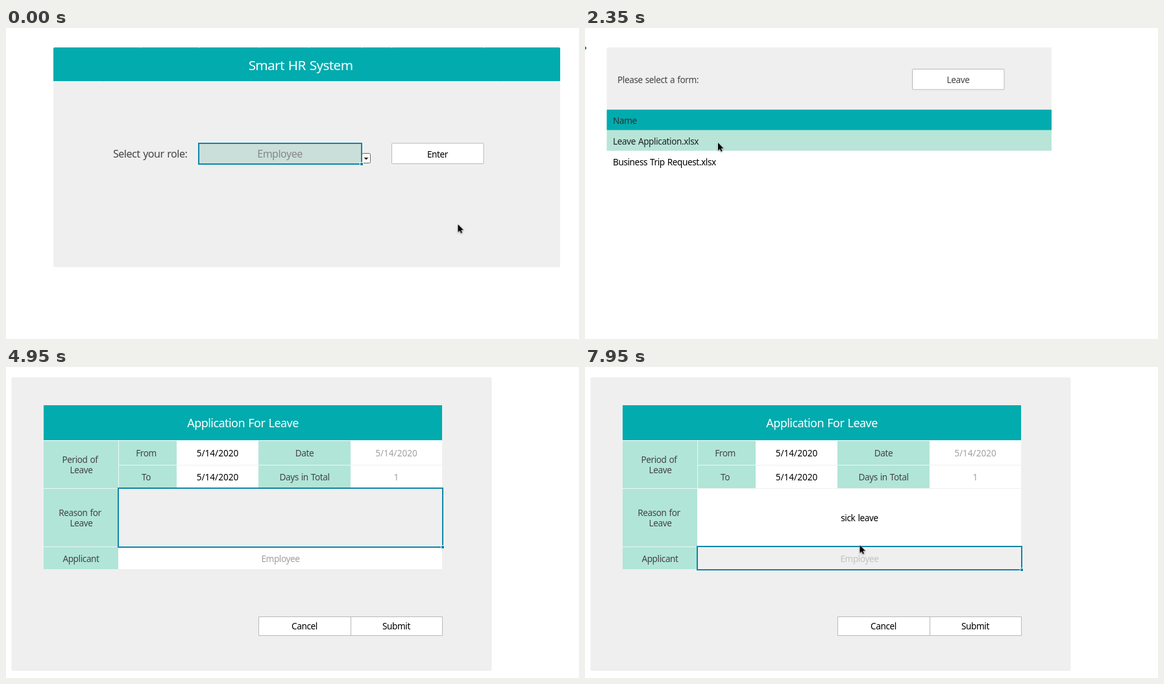
An HTML page that plays this animation: 883x480 px, repeating every 8000 ms.

```html
<!DOCTYPE html>
<html lang="en">
<head>
<meta charset="utf-8">
<title>Leave request demo</title>
<style>
html, body { margin: 0; width: 100%; height: 100%; overflow: hidden; background: #fff; }
svg { display: block; width: 883px; height: 480px; }
text {
  font: 13.6px "Noto Sans", "Open Sans", sans-serif;
  letter-spacing: -.03em; word-spacing: .06em; fill: #000;
}
.mid { text-anchor: middle; }
.title { font-size: 20.7px; fill: #fff; }
.heading { font-size: 18px; fill: #fff; }
.big { font-size: 16px; }
.num { letter-spacing: 0; }
.label { fill: #444; }
.muted { fill: #a0a0a0; }
.panel { fill: #efefef; }
.teal { fill: #02abae; }
.mint { fill: #b8e5d8; }
.cells { fill: #b1e5d8; }
.white { fill: #fff; }
.button { fill: #fff; stroke: #b9b9b9; }
.frame { fill: none; stroke: #0f86a8; stroke-width: 2; }
.handle { fill: #0f86a8; stroke: #fff; }
.editor { fill: #fff; stroke: #23798f; stroke-width: 2; filter: drop-shadow(0 1px 3px rgba(0,0,0,.4)); }

.anim { animation: 8s step-end infinite; }
#home { animation-name: home; }
#roleFocus { animation-name: roleFocus; }
#roleIdle, #enterFocus { animation-name: enterFocus; }
#list { animation-name: list; }
#form { animation-name: form; }
#corner { animation-name: corner; }
#reasonFocus { animation-name: reasonFocus; }
#edit { animation-name: edit; }
#done { animation-name: done; }
#pointer { animation-name: pointer; }
@keyframes home { 0% { opacity: 1 } 18.125%, 100% { opacity: 0 } }
@keyframes roleFocus { 0% { opacity: 1 } 10%, 100% { opacity: 0 } }
@keyframes enterFocus { 0% { opacity: 0 } 10%, 100% { opacity: 1 } }
@keyframes list { 0% { opacity: 0 } 18.125% { opacity: 1 } 36.25%, 100% { opacity: 0 } }
@keyframes form { 0% { opacity: 0 } 36.25%, 100% { opacity: 1 } }
@keyframes corner { 0% { opacity: 1 } 51.875%, 100% { opacity: 0 } }
@keyframes reasonFocus { 0% { opacity: 0 } 51.875% { opacity: 1 } 63.75%, 100% { opacity: 0 } }
@keyframes edit { 0% { opacity: 0 } 63.75% { opacity: 1 } 93.125%, 100% { opacity: 0 } }
@keyframes done { 0% { opacity: 0 } 93.125%, 100% { opacity: 1 } }
@keyframes pointer { 0% { opacity: 1 } 58.75% { opacity: 0 } 96.25%, 100% { opacity: 1 } }

#arrow { animation: travel 8s ease-in-out infinite; filter: drop-shadow(0 1px 1px rgba(0,0,0,.35)); }
@keyframes travel {
  0%, 2% { transform: translate(696.5px, 303px) }
  9.4%, 20.3% { transform: translate(642.5px, 200px) }
  22% { transform: translate(594px, 213px) }
  28.4%, 35% { transform: translate(205px, 177px) }
  37%, 43.5% { transform: translate(204px, 177px) }
  51.3%, 100% { transform: translate(423.5px, 275px) }
}
</style>
</head>
<body>
<svg viewBox="0 0 883 480">
  <g id="home" class="anim">
    <rect class="panel" x="73" y="30" width="781" height="339" rx="2"/>
    <path class="teal" d="M73 82V32q0-2 2-2H852q2 0 2 2V82z"/>
    <path d="M149 82.5h1M761 82.5h1M207 30.5h1M297 30.5h1M390 30.5h1M466 30.5h1M548 30.5h1M594 30.5h1M736 30.5h1" stroke="#8fd5d5"/>
    <text class="title mid" x="454" y="65">Smart HR System</text>
    <text class="big label" x="165" y="200">Select your role:</text>
    <rect class="button" x="594.5" y="178" width="141.5" height="31.5" rx="1"/>
    <text class="mid" x="665" y="200">Enter</text>
    <g id="roleIdle" class="anim">
      <rect class="mint" x="297" y="178" width="250" height="32"/>
      <text class="big mid label" x="422" y="200">Employee</text>
    </g>
    <g id="roleFocus" class="anim">
      <rect x="297" y="178" width="251" height="32" fill="#cadfd9"/>
      <text class="big mid" x="422" y="200" fill="#888" style="fill:#888">Employee</text>
      <rect class="frame" x="297" y="178" width="251" height="32"/>
      <rect x="548.5" y="193.5" width="13" height="15" rx="2" fill="#fff" stroke="#666"/>
      <path d="M551.5 200h7l-3.5 3.5z" fill="#222"/>
      <rect class="handle" x="545.5" y="207.5" width="5" height="5"/>
    </g>
    <g id="enterFocus" class="anim">
      <rect class="frame" x="594" y="178" width="142" height="32"/>
      <rect class="handle" x="734.5" y="207.5" width="5" height="5"/>
    </g>
  </g>

  <g id="list" class="anim">
    <path d="M0 29h2v4h-2z" fill="#0f86a8"/>
    <rect class="panel" x="33.5" y="30" width="685.5" height="97" rx="2"/>
    <rect class="teal" x="33.5" y="126" width="685.5" height="32" rx="1"/>
    <rect class="mint" x="33.5" y="157.5" width="685.5" height="32"/>
    <rect class="button" x="504.5" y="63.5" width="141.5" height="31.5" rx="1"/>
    <text class="label" x="50" y="85">Please select a form:</text>
    <text class="mid label" x="575" y="85">Leave</text>
    <text x="43" y="148" style="fill:#333">Name</text>
    <text x="43" y="180" style="fill:#222">Leave Application.xlsx</text>
    <text x="43" y="212">Business Trip Request.xlsx</text>
  </g>

  <g id="form" class="anim">
    <rect class="panel" x="8.5" y="16" width="740" height="453" rx="2"/>
    <rect class="white" x="58" y="113" width="614" height="199"/>
    <rect class="teal" x="58" y="59" width="614" height="54"/>
    <path class="cells" d="M58 114H263V187H173V312H58zM389 114H531V187H389z"/>
    <path d="M173.5 114V187M174 151.5H263M389 151.5H531M58 187.5H173M58 277.5H173" stroke="#e9f7f4"/>
    <path d="M263 151.5H389M531 151.5H672M173 187.5H672M173 277.5H672" stroke="#f0f0f0"/>
    <text class="heading mid" x="365" y="93">Application For Leave</text>
    <g class="mid">
      <text class="label" x="114" y="148">Period of</text>
      <text class="label" x="116" y="164">Leave</text>
      <text class="label" x="216" y="138">From</text>
      <text class="label" x="216" y="175">To</text>
      <text class="num" x="326" y="138">5/14/2020</text>
      <text class="num" x="326" y="175">5/14/2020</text>
      <text class="label" x="460" y="138">Date</text>
      <text class="label" x="460" y="175">Days in Total</text>
      <text class="num muted" x="601.5" y="138">5/14/2020</text>
      <text class="num muted" x="601.5" y="175">1</text>
      <text class="label" x="114" y="230">Reason for</text>
      <text class="label" x="116" y="246">Leave</text>
      <text class="label" x="115.5" y="301">Applicant</text>
      <text class="muted" x="423" y="301">Employee</text>
    </g>
    <path class="button" d="M389.5 385.5H672.5V414.5H389.5zM531.5 385.5V414.5"/>
    <text class="mid" x="460" y="405">Cancel</text>
    <text class="mid" x="601.5" y="405">Submit</text>

    <g id="corner" class="anim">
      <path class="frame" d="M9.5 0V17H0"/>
      <rect class="handle" x="6.5" y="14.5" width="6" height="5"/>
    </g>
    <g id="reasonFocus" class="anim">
      <rect class="panel" x="173" y="187" width="500" height="91"/>
      <rect class="frame" x="173" y="187" width="500" height="91"/>
      <rect class="handle" x="670.5" y="275.5" width="5" height="5"/>
    </g>
    <g id="edit" class="anim">
      <rect class="editor" x="173" y="187" width="500" height="91"/>
      <rect class="handle" x="670.5" y="275.5" width="5" height="5"/>
      <text id="typed" class="mid" x="423" y="201"></text>
      <path id="caret" d="M.5 188V204" stroke="#000"/>
    </g>
    <g id="done" class="anim">
      <text class="mid" x="423" y="238">sick leave</text>
      <rect class="panel" x="173" y="277" width="500" height="36"/>
      <text class="mid" x="423" y="301" style="fill:#c3c3c3">Employee</text>
      <rect class="frame" x="173" y="277" width="500" height="36"/>
      <rect class="handle" x="670.5" y="310.5" width="5" height="5"/>
    </g>
  </g>

  <g id="pointer" class="anim">
    <path id="arrow" d="M0 0V12.2L2.8 9.6L4.6 13.8L6.6 12.9L4.8 8.8H8.6z" fill="#000" stroke="#fff" stroke-width="1" paint-order="stroke"/>
  </g>
</svg>
<script>
const LOOP = 8000, TYPE_START = 5300, KEY_MS = 145;
const REASON = "sick leave";
const typed = document.getElementById("typed");
const caret = document.getElementById("caret");
const clock = document.getElementById("edit").getAnimations()[0];

function draw() {
  const t = (clock.currentTime || 0) % LOOP;
  const count = Math.max(0, Math.min(REASON.length, Math.floor((t - TYPE_START) / KEY_MS) + 1));
  const text = REASON.slice(0, count);
  if (typed.textContent !== text) typed.textContent = text;

  const width = text ? typed.getComputedTextLength() : 0;
  const rest = t - (TYPE_START + KEY_MS * REASON.length);
  caret.setAttribute("transform", `translate(${Math.round(423 + width / 2) - 1})`);
  caret.style.opacity = rest > 0 && rest % 1000 >= 500 ? 0 : 1;
  requestAnimationFrame(draw);
}
draw();
</script>
</body>
</html>
```
